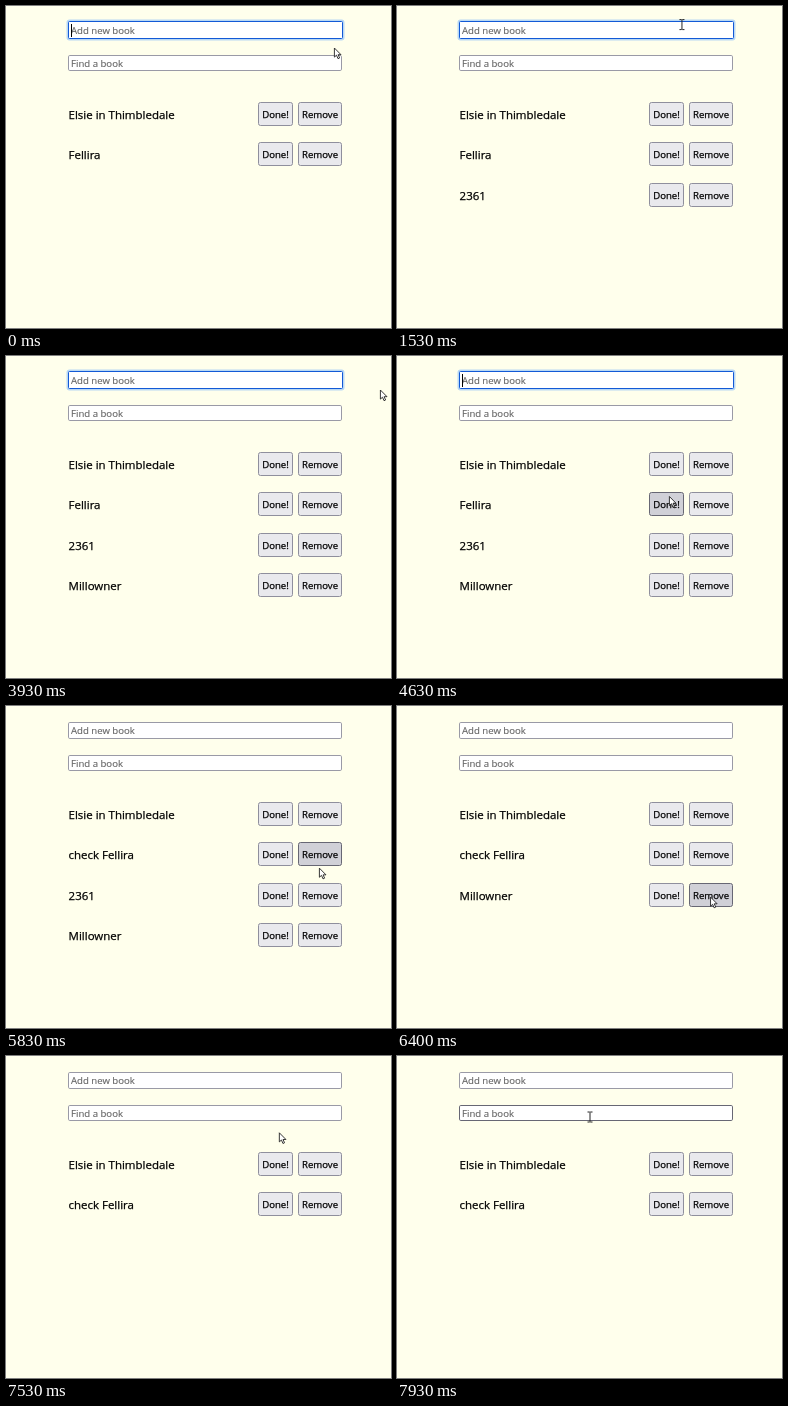
An HTML page that plays this animation: 385 by 322 pixels, repeating every 8000 ms.

```html
<!DOCTYPE html>
<html lang="en">
<head>
<meta charset="utf-8">
<title>Book list</title>
<style>
  html, body { margin: 0; width: 100%; height: 100%; overflow: hidden; background: #ffffec; }
  svg { display: block; width: 385px; height: 322px; }
  text { font: 9.6px "Open Sans", "Noto Sans", sans-serif; white-space: pre; stroke: #000; stroke-width: .25px; }
  .title { font-size: 11.48px; }
  .hint { fill: #666; stroke: #666; stroke-width: .15px; }
</style>
</head>
<body>
<svg id="stage" viewBox="0 0 385 322"></svg>
<script>
const LOOP = 8000;
const BLINK = 210;      // caret on or off time
const GLIDE = 280;      // longest pointer move
const HOVER_LAG = 35;
const PRESS = 30;
const CHECKED = 5230;
const FOCUS_END = CHECKED - PRESS;

const stage = document.getElementById('stage');
const measure = document.createElement('canvas').getContext('2d');
measure.font = '9.6px "Open Sans", "Noto Sans", sans-serif';

const BOOKS = [
  { title: 'Elsie in Thimbledale', added: 0, removed: LOOP },
  { title: 'Fellira', added: 0, removed: LOOP, checked: CHECKED },
  { title: '2361', typing: 430, pace: 90, added: 860, removed: 6130 },
  { title: 'Millowner', typing: 2160, pace: 109, added: 3230, removed: 6760 },
];
const CLICKS = [CHECKED, ...BOOKS.map(book => book.removed)];
const FIELDS = [
  { x: 62, y: 16, w: 274, h: 17, hint: 'Add new book' },
  { x: 62, y: 49, w: 274, h: 16, hint: 'Find a book' },
];

// Key points of the pointer: arrival time, x, y
const POINTER = [
  [30, 328, 41.5], [100, 350, 36], [230, 328, 17],
  [1530, 285, 19], [1730, 276, -60], [3700, 400, -12],
  [3930, 374, 33.5], [4330, 318, 159], [4630, 272, 140],
  [5830, 313, 161.5], [6000, 314, 188], [6600, 311, 197],
  [7080, 311, 108], [7700, 215, 28], [7930, 193, 61],
];

const inside = (p, b) => p.x >= b.x && p.x <= b.x + b.w && p.y >= b.y && p.y <= b.y + b.h;

function pointerAt(t) {
  const next = POINTER.findIndex(stop => stop[0] > t);
  const [arrival, x, y] = POINTER.at(next);
  if (next < 1) return { x, y };
  const [left, x0, y0] = POINTER[next - 1];
  const k = Math.max(0, 1 - (arrival - t) / Math.min(GLIDE, arrival - left));
  return { x: x0 + (x - x0) * k, y: y0 + (y - y0) * k };
}

function typedAt(t) {
  const book = BOOKS.find(b => t >= b.typing && t < b.added);
  return book ? book.title.slice(0, 1 + Math.floor((t - book.typing) / book.pace)) : '';
}

function caretAt(t, typed) {
  const lastEdit = Math.max(...BOOKS.map(b => b.added).filter(added => added <= t));
  return typed !== '' || Math.floor((t - lastEdit) / BLINK) % 2 === 0;
}

const label = (x, y, str, attrs = '') => `<text x="${x}" y="${y}" ${attrs}>${str}</text>`;

function box(b, fill, stroke, radius) {
  return `<rect x="${b.x + .5}" y="${b.y + .5}" width="${b.w - 1}" height="${b.h - 1}"
    rx="${radius}" fill="${fill}" stroke="${stroke}"/>`;
}

function field(f, hover, focused, typed, caret) {
  const base = f.y + 12;
  let out = '';
  if (focused) {
    const ring = { x: f.x, y: f.y - 1, w: f.w + 1, h: f.h + 1 };
    out += `<rect x="60.5" y="${f.y - 2.5}" width="278" height="${f.h + 4}" rx="3" fill="#b9d8f4"/>`;
    out += box(ring, '#fff', '#1259d6', 1);
  } else {
    out += box(f, '#fff', hover ? '#676774' : '#9a9aa6', 1.3);
  }
  out += typed ? label(65, base, typed) : label(65, base, f.hint, 'class="hint"');
  if (caret) {
    const x = 65 + Math.round(measure.measureText(typed).width);
    out += `<rect x="${x}" y="${f.y + 2}" width="1" height="13"/>`;
  }
  return out;
}

function button(b, str, over, pressed) {
  const hover = inside(over, b);
  const fill = !hover ? '#e9e9ed' : pressed ? '#b1b1b9' : '#d0d0d7';
  return box(b, fill, hover ? '#676774' : '#8f8f9d', 2) +
    label(b.x + b.w / 2, b.y + 16, str, 'text-anchor="middle"');
}

function row(title, index, over, pressed) {
  const y = Math.round(96 + index * 40.4);
  return label(62.6, y + 17, title, 'class="title"') +
    button({ x: 252, y, w: 35, h: 24 }, 'Done!', over, pressed) +
    button({ x: 292, y, w: 44, h: 24 }, 'Remove', over, pressed);
}

function pointer(p) {
  const at = `transform="translate(${p.x} ${p.y})"`;
  return FIELDS.some(f => inside(p, f))
    ? `<path ${at} d="M-2.5-5H-.6L0-4.5 .6-5H2.5M0-4.5V4.5M-2.5 5H-.6L0 4.5 .6 5H2.5" fill="none" stroke="#222"/>`
    : `<path ${at} d="M.4.5V9.6L2.5 7.7 4 11.2 5.6 10.5 4.1 7.2H7Z" fill="#fff" stroke="#222" stroke-width=".9"/>`;
}

function render(t) {
  const over = pointerAt(t - HOVER_LAG);
  const pressed = CLICKS.some(click => t < click && t >= click - PRESS);
  const focused = t < FOCUS_END;
  const typed = typedAt(t);
  const titles = BOOKS
    .filter(book => t >= book.added && t < book.removed)
    .map(book => (t >= book.checked ? 'check ' : '') + book.title);
  stage.innerHTML =
    field(FIELDS[0], inside(over, FIELDS[0]), focused, typed, focused && caretAt(t, typed)) +
    field(FIELDS[1], inside(over, FIELDS[1]), false, '', false) +
    titles.map((title, i) => row(title, i, over, pressed)).join('') +
    pointer(pointerAt(t));
}

const start = performance.now();
function tick() {
  render((performance.now() - start) % LOOP);
  requestAnimationFrame(tick);
}
tick();
</script>
</body>
</html>
```
